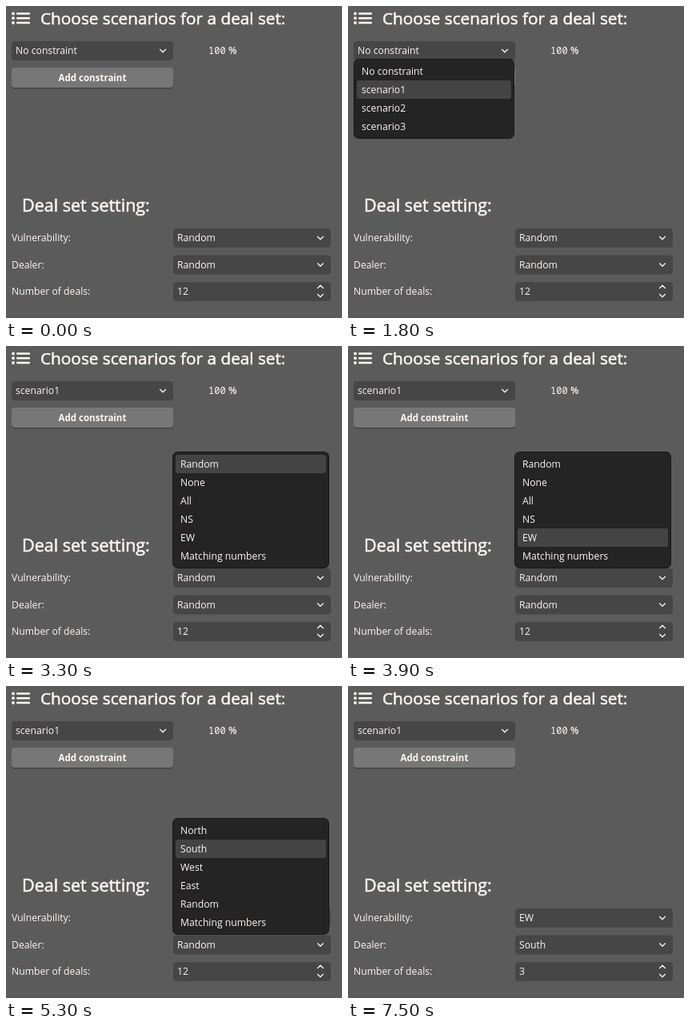
Animation, 420 px wide and 390 px high, one loop 9100 ms. Source, as an HTML page:

```html
<!DOCTYPE html>
<html lang="en">
<head>
<meta charset="utf-8">
<title>Deal set form</title>
<style>
  html, body { margin: 0; width: 100%; height: 100%; overflow: hidden; background: #5b5b5b; }
  svg { display: block; width: 420px; height: 390px; }
  text { font: 12.2px "Open Sans", "Noto Sans", sans-serif; fill: #fff6f3; white-space: pre; }
  .title { font-size: 20.75px; stroke: #fff6f3; stroke-width: .55; }
  .subtitle { font-size: 21.5px; }
  .bold { font-size: 11.5px; font-weight: 700; text-anchor: middle; }
  .mono { font: 12px "Noto Sans Mono", monospace; }
  .percent { font-weight: 600; }
  .chevron { fill: none; stroke: #fff6f3; stroke-width: 1.25; stroke-linecap: round; stroke-linejoin: round; }
</style>
</head>
<body>
<svg id="stage" viewBox="0 0 420 390"></svg>
<script>
const LOOP = 9100;
const ROW = 23;
const stage = document.getElementById('stage');

const rect = (x, y, w, h, fill, r = 0, extra = '') =>
  `<rect x="${x}" y="${y}" width="${w}" height="${h}" rx="${r}" fill="${fill}" ${extra}/>`;
const label = (x, y, text, cls = '') => `<text x="${x}" y="${y}" class="${cls}">${text}</text>`;
const chevron = (x, y, dir = 1) =>
  `<path class="chevron" d="M${x - 3.5} ${y - 1.7 * dir}l3.5 ${3.5 * dir}l3.5 ${-3.5 * dir}"/>`;

const field = (x, y, w, text) =>
  rect(x, y, w, 24, '#464646', 4) + label(x + 5, y + 16.2, text);
const select = (x, y, w, text) => field(x, y, w, text) + chevron(x + w - 13, y + 12);

function popup(x, y, w, items, active) {
  const height = items.length * ROW + 8;
  return rect(x + .5, y + .5, w - 1, height - 1, '#242424', 6, 'stroke="#161616"') +
    rect(x + 4, y + 4 + active * ROW, w - 8, ROW, '#444', 3) +
    items.map((item, i) => label(x + 10, y + 20 + i * ROW, item)).join('');
}

// Value of the last [time, value] step that has been reached.
const step = (t, steps) => steps.filter(([start]) => t >= start).pop()[1];

const menuIcon = [9.5, 15.2, 21].map(y =>
  `<circle cx="9" cy="${y}" r="1.9" fill="#fff6f3"/>` + rect(13, y - 1.25, 17, 2.5, '#fff6f3', 1)).join('');

const fixed = menuIcon +
  label(43, 23, 'Choose scenarios for a deal set:', 'title') +
  label(253, 60, '100', 'mono') + label(278, 60, '%', 'percent') +
  label(20, 257, 'Deal set setting:', 'title subtitle') +
  label(7, 294, 'Vulnerability:') + label(7, 328, 'Dealer:') + label(7, 361, 'Number of deals:');

const menus = [
  { x: 7, y: 66, w: 201, items: ['No constraint', 'scenario1', 'scenario2', 'scenario3'],
    steps: [[0, -1], [1100, 0], [1600, 1], [2000, -1]] },
  { x: 208, y: 132, w: 196, items: ['Random', 'None', 'All', 'NS', 'EW', 'Matching numbers'],
    steps: [[0, -1], [3300, 0], [3800, 3], [3900, 4], [4200, -1]] },
  { x: 208, y: 165, w: 196, items: ['North', 'South', 'West', 'East', 'Random', 'Matching numbers'],
    steps: [[0, -1], [4800, 4], [5100, 3], [5200, 2], [5300, 1], [5600, -1]] }
];

function addButton(hovered) {
  return rect(7, 78, 202, 25.5, '#434343', 4) +
    rect(7, 77, 202, 25, hovered ? '#828282' : '#777', 4) +
    label(108, 94, 'Add constraint', 'bold');
}

function numberField(t) {
  const caret = step(t, [[0, 0], [6300, 227], [6500, 0], [7200, 220], [7500, 0]]);
  const selected = t >= 6500 && t < 7200;
  return rect(209, 345, 197, 24, '#464646', 4) +
    (selected ? rect(214, 349, 15, 16, '#787878') : '') +
    label(214, 361, t < 7200 ? '12' : '3') +
    (caret ? rect(caret, 349, 1, 15, '#fff6f3') : '') +
    chevron(393, 351, -1) + chevron(393, 362);
}

function scene(t) {
  const open = menus.map(menu => {
    const active = step(t, menu.steps);
    return active < 0 ? '' : popup(menu.x, menu.y, menu.w, menu.items, active);
  });
  return fixed +
    select(7, 44, 202, t < 2100 ? 'No constraint' : 'scenario1') +
    addButton(t >= 2100 && t < 2300) +
    select(209, 278, 197, t < 4200 ? 'Random' : 'EW') +
    select(209, 311.5, 197, t < 5700 ? 'Random' : 'South') +
    numberField(t) + open.join('');
}

let shown = '';
function draw() {
  const markup = scene(performance.now() % LOOP);
  if (markup !== shown) stage.innerHTML = shown = markup;
  requestAnimationFrame(draw);
}
draw();
</script>
</body>
</html>
```
